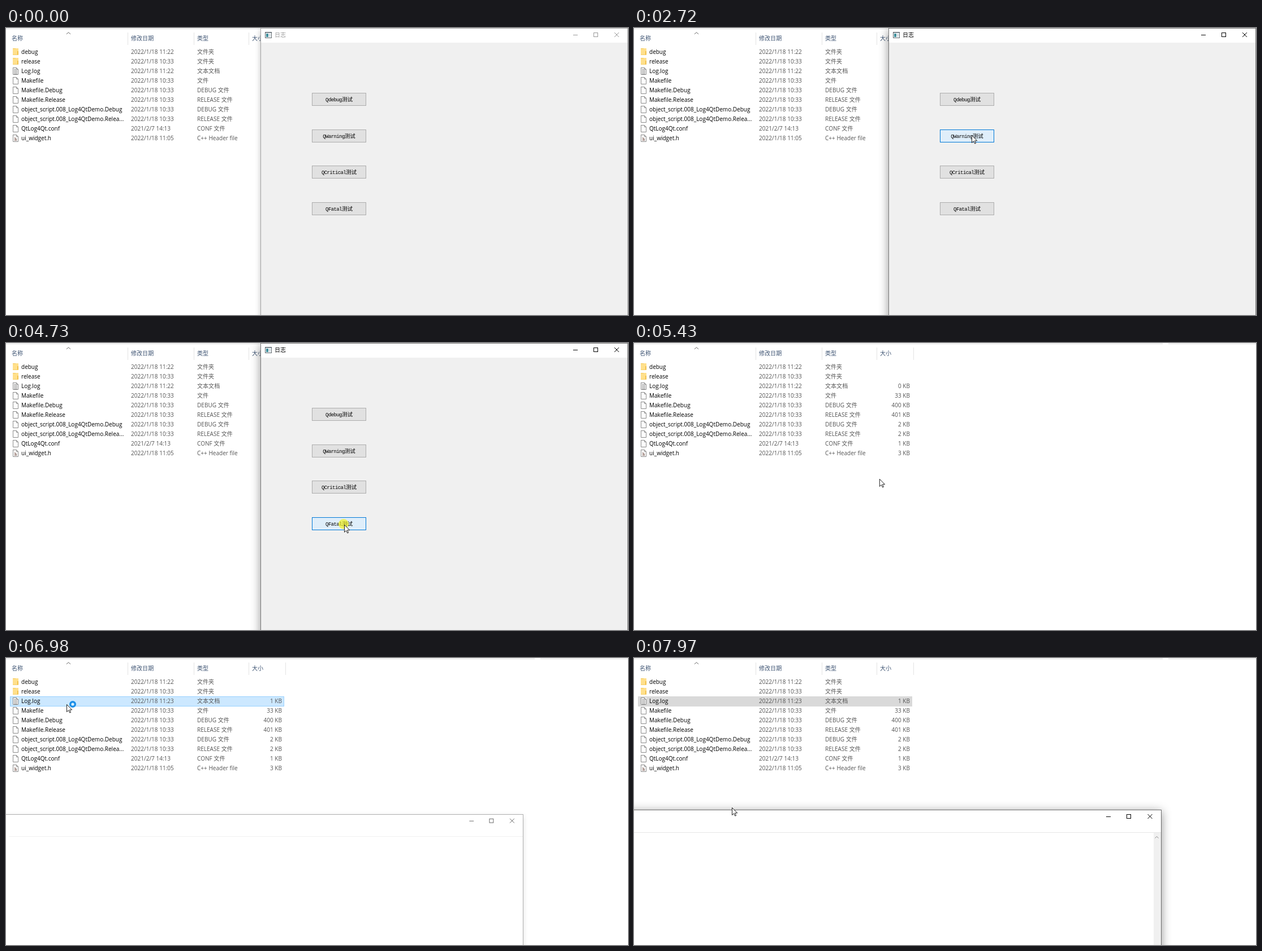
These frames come from a looping animation (1100 px wide and 509 px high, 8000 ms). An HTML page with a canvas:

```html
<!DOCTYPE html>
<html lang="zh">
<head>
<meta charset="utf-8">
<style>
  html, body { margin: 0; width: 100%; height: 100%; overflow: hidden; background: #fff; }
  canvas { display: block; }
</style>
</head>
<body>
<canvas id="stage" width="1100" height="509"></canvas>
<script>
const ctx = document.getElementById('stage').getContext('2d');
const LOOP = 8000;
const UI = '10.05px "Open Sans", "Noto Sans CJK SC", "Noto Sans CJK", sans-serif';
const NAME = '500 10px "Open Sans", "Noto Sans CJK SC", "Noto Sans CJK", sans-serif';
const MONO = '9px "Liberation Mono", monospace';
const CJK = '500 9.5px "Noto Sans CJK SC", "Noto Sans CJK", sans-serif';

const files = [
  ['folder', 'debug', '2022/1/18 11:22', '文件夹', ''],
  ['folder', 'release', '2022/1/18 10:33', '文件夹', ''],
  ['text', 'Log.log', '2022/1/18 11:22', '文本文档', '0 KB'],
  ['file', 'Makefile', '2022/1/18 10:33', '文件', '33 KB'],
  ['file', 'Makefile.Debug', '2022/1/18 10:33', 'DEBUG 文件', '400 KB'],
  ['file', 'Makefile.Release', '2022/1/18 10:33', 'RELEASE 文件', '401 KB'],
  ['file', 'object_script.008_Log4QtDemo.Debug', '2022/1/18 10:33', 'DEBUG 文件', '2 KB'],
  ['file', 'object_script.008_Log4QtDemo.Relea...', '2022/1/18 10:33', 'RELEASE 文件', '2 KB'],
  ['file', 'QtLog4Qt.conf', '2021/2/7 14:13', 'CONF 文件', '1 KB'],
  ['header', 'ui_widget.h', '2022/1/18 11:05', 'C++ Header file', '3 KB'],
];
const buttons = [['Qdebug', 115], ['QWarning', 180], ['QCritical', 244], ['QFatal', 309]];

// Pointer stops: time, x, y
const stops = [
  [110, 1012, 464], [670, 609, 123], [1690, 609, 123], [2180, 597, 190],
  [2790, 597, 190], [3130, 597, 254], [3350, 597, 254], [3420, 597, 258],
  [3900, 597, 258], [4390, 598, 316], [4460, 598, 322], [5280, 598, 322],
  [5840, 169, 110], [6110, 107, 82], [7260, 107, 82], [7970, 173, 265],
];
const clicks = [940, 2370, 3620, 4700, 6440, 6650];
const PRESS = 140, SAMPLE = 70;
const SELECTED = 6440, BUSY = 6720, UNFOCUSED = 7190;

const clamp = v => Math.max(0, Math.min(1, v));
const lerp = (a, b, u) => a + (b - a) * u;

function pointerAt(t) {
  if (t < stops[0][0]) return null;
  const i = stops.findLastIndex(s => s[0] <= t);
  const a = stops[i], b = stops[i + 1] || a;
  const passed = Math.floor((t - a[0]) / SAMPLE) * SAMPLE;
  const u = Math.sin(passed / (b[0] - a[0] || 1) * Math.PI / 2);
  return { x: lerp(a[1], b[1], u), y: lerp(a[2], b[2], u) };
}

function sinceClick(t) {
  const last = clicks.findLast(c => c <= t);
  return last === undefined ? Infinity : t - last;
}

function box(x, y, w, h, fill, stroke) {
  ctx.fillStyle = fill;
  ctx.fillRect(x, y, w, h);
  if (stroke) {
    ctx.strokeStyle = stroke;
    ctx.strokeRect(x + .5, y + .5, w - 1, h - 1);
  }
}

function lines(color, ...paths) {
  ctx.strokeStyle = color;
  ctx.beginPath();
  for (const p of paths)
    for (let i = 0; i < p.length; i += 2) ctx[i ? 'lineTo' : 'moveTo'](p[i], p[i + 1]);
  ctx.stroke();
}

function text(s, x, y, color, font = UI, align = 'left') {
  ctx.font = font;
  ctx.fillStyle = color;
  ctx.textAlign = align;
  ctx.fillText(s, x, y);
}

function fileIcon(kind, y) {
  if (kind === 'folder') {
    box(12, y + 2, 10, 12, '#ffe08c');
    box(12, y + 2, 5, 1, '#f3c95e');
    box(20, y + 7, 2, 7, '#f2c14d');
    box(12, y + 13, 10, 1, '#f5cf6a');
    return;
  }
  ctx.fillStyle = '#fff';
  ctx.fillRect(12, y + 2, 10, 13);
  lines('#8c8c8c',
    [12.5, y + 2.5, 18.5, y + 2.5, 21.5, y + 5.5, 21.5, y + 14.5, 12.5, y + 14.5, 12.5, y + 2],
    [18.5, y + 2.5, 18.5, y + 5.5, 21.5, y + 5.5]);
  if (kind === 'text')
    for (let k = 5; k < 14; k += 2) box(14, y + k, k < 6 ? 4 : 6, 1, '#9a9a9a');
  if (kind === 'header') text('h', 17, y + 13, '#7a5a50', 'bold 7px "Noto Serif", serif', 'center');
}

function explorer(t, pointer) {
  box(0, 1, 935, 1, '#dcdcdc');
  box(945, 1, 155, 1, '#dcdcdc');
  for (const x of [215, 332, 429, 494]) box(x, 8, 1, 22, '#e3e3e3');
  lines('#666', [107, 11, 110.5, 7.5, 114, 11]);
  [['名称', 10], ['修改日期', 221], ['类型', 338], ['大小', 435]]
    .forEach(([s, x]) => text(s, x, 22, '#3d5372'));

  const overList = pointer && pointer.x < 492;
  const hovered = overList ? Math.floor((pointer.y - 34) / 17) : -1;
  files.forEach(([kind, name, date, type, size], i) => {
    const y = 34 + 17 * i;
    const written = i === 2 && t >= SELECTED;
    if (written && t >= UNFOCUSED) box(7, y, 485, 18, '#d9d9d9');
    else if (written) box(7, y, 485, 18, '#cce8ff', '#99d1ff');
    else if (i === hovered) box(7, y, 485, 18, '#e5f3ff');
    fileIcon(kind, y);
    text(name, 27, y + 12, '#000', NAME);
    text(written ? '2022/1/18 11:23' : date, 221, y + 12, '#555');
    text(type, 338, y + 12, '#555');
    text(written ? '1 KB' : size, 488, y + 12, '#555', UI, 'right');
  });
}

function captionButtons([min, max, close], y, color) {
  lines(color, [min - 4, y + .5, min + 4, y + .5],
    [close - 4, y - 4, close + 4, y + 4], [close + 4, y - 4, close - 4, y + 4]);
  ctx.strokeRect(max - 3.5, y - 3.5, 7, 7);
}

// The shadow stays outside the frame so that a fading window keeps a clean body
function frame(x, y, w, h, fill, border, active) {
  ctx.save();
  ctx.beginPath();
  ctx.rect(-100, -100, 1400, 1200);
  ctx.rect(x, y, w, h);
  ctx.clip('evenodd');
  ctx.shadowColor = active ? 'rgba(0,0,0,.42)' : 'rgba(0,0,0,.25)';
  ctx.shadowBlur = active ? 16 : 9;
  ctx.shadowOffsetY = 3;
  box(x, y, w, h, fill);
  ctx.restore();
  box(x, y, w, h, fill, border);
}

// Draws a window scaled about (cx, cy), as the desktop does on open and close
function scaled(cx, cy, scale, alpha, draw) {
  ctx.save();
  ctx.globalAlpha = alpha;
  ctx.translate(cx, cy);
  ctx.scale(scale, scale);
  ctx.translate(-cx, -cy);
  draw();
  ctx.restore();
}

function testWindow(t, pointer) {
  const active = t >= clicks[0];
  const ink = active ? '#000' : '#999';
  frame(450, 0, 650, 560, '#f0f0f0', active ? '#777' : '#a5a5a5', active);
  box(451, 1, 648, 25, '#fff');
  box(458, 7, 12, 11, '#fff', '#5d666c');
  box(459, 8, 10, 1, '#9aa5ad');
  box(460, 10, 4, 6, '#3f8f9c');
  box(465, 10, 3, 6, '#d5dde2');
  text('日志', 475, 16, ink);
  captionButtons([1007, 1043, 1080], 12, ink);

  const since = sinceClick(t);
  const pressed = clamp(since < PRESS ? since / PRESS : 1 - (since - PRESS) / 280);
  for (const [label, y] of buttons) {
    const hot = pointer && pointer.x >= 541 && pointer.x < 637 && pointer.y >= y && pointer.y < y + 23;
    const tint = [[229, 204], [241, 228], [251, 247]].map(([a, b]) => Math.round(lerp(a, b, pressed)));
    box(541, y, 96, 23, hot ? `rgb(${tint})` : '#e1e1e1', hot ? '#0078d7' : '#adadad');
    const x = 589 - (label.length * 4.8 + 19) / 2;
    ctx.letterSpacing = '-0.6px';
    text(label, x, y + 14.5, '#000', MONO);
    ctx.letterSpacing = '0px';
    text('测试', x + label.length * 4.8, y + 15, '#000', CJK);
  }
}

function editorWindow(t) {
  const active = t >= UNFOCUSED;
  frame(-20, 269, 953, 640, '#fff', active ? '#6e6e6e' : '#777', active);
  box(0, 309, 932, 1, '#e6e6e6');
  captionButtons([839, 875, 912.5], 281, '#000');
  if (t >= 7260) {
    box(919, 310, 13, 199, '#f0f0f0');
    lines('#8a8a8a', [921.5, 319.5, 924.5, 316.5, 927.5, 319.5]);
  }
}

function drawPointer(t, { x, y }) {
  if (sinceClick(t) < PRESS) {
    ctx.fillStyle = 'rgba(245,245,20,.65)';
    ctx.beginPath();
    ctx.arc(x - 1, y - 1, 9, 0, 7);
    ctx.fill();
  }
  ctx.save();
  ctx.translate(x + .5, y + .5);
  ctx.scale(.77, .77);
  const arrow = new Path2D('M0 0V17L4 13.2L6.8 19L9.2 18L6.6 12.2H12Z');
  ctx.fillStyle = '#fff';
  ctx.fill(arrow);
  ctx.strokeStyle = '#111';
  ctx.lineWidth = 1.2;
  ctx.stroke(arrow);
  ctx.restore();
  if (t >= BUSY && t < 7260) {
    ctx.save();
    ctx.beginPath();
    ctx.arc(x + 11, y, 4.3, 0, 7);
    ctx.fillStyle = '#d8f0ff';
    ctx.fill();
    ctx.strokeStyle = '#1c8fe8';
    ctx.lineWidth = 3.4;
    ctx.stroke();
    ctx.restore();
  }
}

function render(t) {
  const pointer = pointerAt(t);
  const closing = clamp(Math.floor((t - 4980) / SAMPLE) / 4);
  ctx.lineWidth = 1;
  box(0, 0, 1100, 509, '#fff');
  explorer(t, closing < 1 ? null : pointer);
  if (closing < 1)
    scaled(775, 280, 1 - closing * .1, 1 - closing, () => testWindow(t, pointer));
  if (t >= 6910) {
    const [scale, alpha] = t < 6980 ? [.94, .25] : t < 7110 ? [.975, .6] : [1, 1];
    scaled(212, 589, scale, alpha, () => editorWindow(t));
  }
  if (pointer) drawPointer(t, pointer);
}

function tick() {
  render(performance.now() % LOOP);
  requestAnimationFrame(tick);
}
tick();
</script>
</body>
</html>
```
